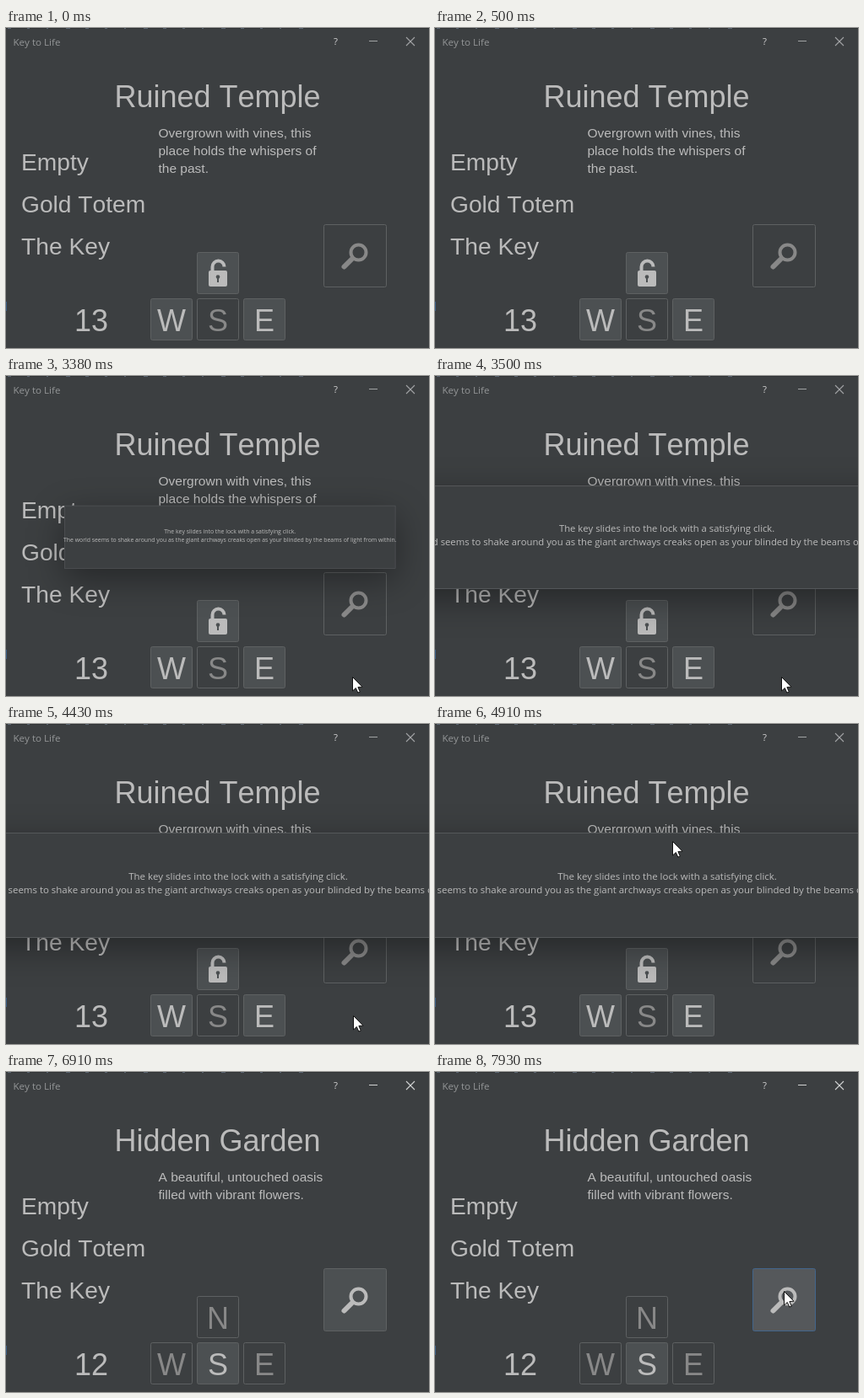
Write an HTML page with a canvas that moves like this. It is 501 px wide and 380 px high and loops after 8000 ms.

```html
<!DOCTYPE html>
<html lang="en">
<head>
<meta charset="utf-8">
<title>Text adventure</title>
<style>
html, body { margin: 0; width: 100%; height: 100%; overflow: hidden; background: #3c3f41; }
canvas { display: block; }
</style>
</head>
<body>
<canvas id="stage" width="501" height="380"></canvas>
<script>
const ctx = document.getElementById('stage').getContext('2d');
const LOOP = 8000;
const SANS = '"Liberation Sans", Arial, sans-serif';
const UI = '"Open Sans", "Noto Sans", sans-serif';
const BG = '#3c3f41', TEXT = '#bbbbbb', DIM = '#888888';

const temple = {
  name: 'Ruined Temple', moves: '13', search: false,
  lines: ['Overgrown with vines, this', 'place holds the whispers of', 'the past.'],
  exits: { N: true, W: true, S: false, E: true }, lock: true
};
const garden = {
  name: 'Hidden Garden', moves: '12', search: true,
  lines: ['A beautiful, untouched oasis', 'filled with vibrant flowers.'],
  exits: { N: false, W: false, S: true, E: false }, lock: false
};

// Cursor moves: start, end, number of steps, waypoints, time it vanishes
const moves = [
  { a: 2360, b: 2700, n: 6, pts: [[419.5, 364.5], [410.5, 357.5]], until: 4430 },
  { a: 4430, b: 4910, n: 8, pts: [[411.5, 346.5], [345, 235], [281.5, 139.5]], until: 5450 },
  { a: 5450, b: 5710, n: 5, pts: [[302, 146], [400, 174], [503, 195]], until: 5710 },
  { a: 7450, b: 7930, n: 8, pts: [[459.5, 231.5], [430, 248], [413.5, 260.5]], until: LOOP }
];

function cursorAt(t) {
  const m = moves.find(m => t >= m.a && t < m.until);
  if (!m) return null;
  const step = (m.b - m.a) / (m.n - 1);
  const k = Math.min(m.n - 1, Math.floor((t - m.a) / step + 1e-6));
  const p = k / (m.n - 1);
  const e = p * p * (3 - 2 * p);
  const s = e * (m.pts.length - 1);
  const i = Math.min(m.pts.length - 2, Math.floor(s));
  const [p0, p1] = [m.pts[i], m.pts[i + 1]];
  return p0.map((v, j) => v + (p1[j] - v) * (s - i));
}

function text(str, x, y, size, color = TEXT, family = SANS, align = 'left') {
  ctx.font = `${size}px ${family}`;
  ctx.fontKerning = 'none';
  ctx.textAlign = align;
  ctx.fillStyle = color;
  ctx.fillText(str, x, y);
}

function line(x1, y1, x2, y2, color, width) {
  ctx.strokeStyle = color;
  ctx.lineWidth = width;
  ctx.beginPath();
  ctx.moveTo(x1, y1);
  ctx.lineTo(x2, y2);
  ctx.stroke();
}

function box(x, y, size, on, hover) {
  ctx.beginPath();
  ctx.roundRect(x + 0.5, y + 0.5, size - 1, size - 1, 2);
  ctx.fillStyle = hover ? '#55585b' : on ? '#4c5052' : BG;
  ctx.fill();
  ctx.strokeStyle = hover ? '#42658c' : '#5e6162';
  ctx.lineWidth = 1;
  ctx.stroke();
}

function exitButton(label, x, y, on) {
  box(x, y, 50, on);
  if (label) text(label, x + 25, y + 39, 36, on ? TEXT : DIM, SANS, 'center');
}

function padlock() {
  ctx.strokeStyle = TEXT;
  ctx.lineWidth = 4;
  ctx.lineCap = 'butt';
  ctx.beginPath();
  ctx.moveTo(244.5, 290);
  ctx.lineTo(244.5, 283.5);
  ctx.arc(251.5, 283.5, 7, Math.PI, 0);
  ctx.stroke();
  ctx.fillStyle = TEXT;
  ctx.beginPath();
  ctx.roundRect(240, 288, 22, 19, 2);
  ctx.fill();
  ctx.fillStyle = '#4c5052';
  ctx.beginPath();
  ctx.arc(251, 295.5, 2.3, 0, 7);
  ctx.fill();
  ctx.fillRect(250, 296, 2, 6);
}

function magnifier(color) {
  ctx.lineCap = 'round';
  line(409.5, 274.5, 400.5, 283.5, color, 6);
  line(411, 273, 407, 277, color, 3);
  ctx.lineWidth = 4;
  ctx.beginPath();
  ctx.arc(417.5, 266.5, 9, 0, 7);
  ctx.stroke();
  ctx.lineCap = 'butt';
}

function titleBar(bright) {
  const color = bright ? '#d2d3d3' : '#a2a4a5';
  text('Key to Life', 8.5, 21, 11.6, '#949697', UI);
  text('?', 390.5, 20, 11.5, '#d0d0d0', 'bold'.length ? UI : SANS, 'center');
  line(430, 15.5, 440, 15.5, color, 1);
  line(474, 11, 484, 21, color, 1.1);
  line(484, 11, 474, 21, color, 1.1);
}

// Slivers of the window behind, along the top and left edges
function edges() {
  ctx.fillStyle = '#2f3234';
  ctx.fillRect(0, 0, 501, 1);
  ctx.fillStyle = '#56616d';
  for (let x = 2; x < 360; x += 9 + (x * 7) % 23) ctx.fillRect(x, 0, 2 + x % 4, 1);
  ctx.fillStyle = '#3b5f86';
  ctx.fillRect(0, 325, 1, 11);
}

function room(r, hover) {
  text(r.name, 250.5, 94, 36, TEXT, SANS, 'center');
  r.lines.forEach((s, i) => text(s, 180.5, 130 + 21 * i, 15.5));
  ['Empty', 'Gold Totem', 'The Key'].forEach((s, i) => text(s, 18, 169 + 50 * i, 28.2));
  text(r.moves, 81, 360, 36);
  exitButton(r.lock ? '' : 'N', 226, 266, r.exits.N);
  if (r.lock) padlock();
  exitButton('W', 171, 321, r.exits.W);
  exitButton('S', 226, 321, r.exits.S);
  exitButton('E', 281, 321, r.exits.E);
  box(376, 233, 75, r.search, hover);
  magnifier(r.search ? TEXT : DIM);
}

function dialog(t) {
  const age = Math.floor((t - 3380) / 65 + 0.16) * 65;
  const s = t >= 3640 ? 1 : 1 - 0.4 * Math.exp(-age / 41);
  ctx.save();
  ctx.translate(250.5, 191);
  ctx.scale(s, s);
  ctx.translate(-250.5, -191);
  ctx.save();
  ctx.shadowColor = 'rgba(0,0,0,0.38)';
  ctx.shadowBlur = 42;
  ctx.shadowOffsetY = 12;
  ctx.fillStyle = BG;
  ctx.fillRect(-52, 129, 654, 125);
  ctx.restore();
  ctx.strokeStyle = '#55585a';
  ctx.lineWidth = 1;
  ctx.strokeRect(-51.5, 129.5, 653, 124);
  text('The key slides into the lock with a satisfying click.', 275, 185, 11.46, TEXT, UI, 'center');
  text('The world ', 2.5, 201, 11.46, TEXT, UI, 'right');
  text('seems to shake around you as the giant archways creaks open as your blinded by the beams of light from within.',
    2.5, 201, 11.46, TEXT, UI);
  ctx.restore();
}

function arrow([x, y]) {
  const shape = [[0, 0], [0, 16.5], [3.8, 13], [6.3, 18.6], [8.8, 17.6], [6.4, 12], [11.5, 11.7]];
  ctx.beginPath();
  shape.forEach(([dx, dy]) => ctx.lineTo(x + dx, y + dy));
  ctx.closePath();
  ctx.fillStyle = '#ffffff';
  ctx.fill();
  ctx.strokeStyle = '#111111';
  ctx.lineWidth = 1;
  ctx.stroke();
}

function draw(t) {
  const inGarden = t >= 6910;
  const cursor = cursorAt(t);
  const hover = inGarden && cursor && cursor[0] < 451 && cursor[1] > 233;
  ctx.fillStyle = BG;
  ctx.fillRect(0, 0, 501, 380);
  room(inGarden ? garden : temple, hover);
  if (t >= 3380 && !inGarden) dialog(t);
  titleBar(inGarden);
  edges();
  if (t >= 5110 && t < 5450) {
    ctx.fillStyle = 'rgba(255,255,0,0.47)';
    ctx.beginPath();
    ctx.arc(281, 139, 12, 0, 7);
    ctx.fill();
  }
  if (cursor) arrow(cursor);
}

const start = performance.now();
function tick() {
  draw((performance.now() - start) % LOOP);
  requestAnimationFrame(tick);
}
tick();
</script>
</body>
</html>
```
